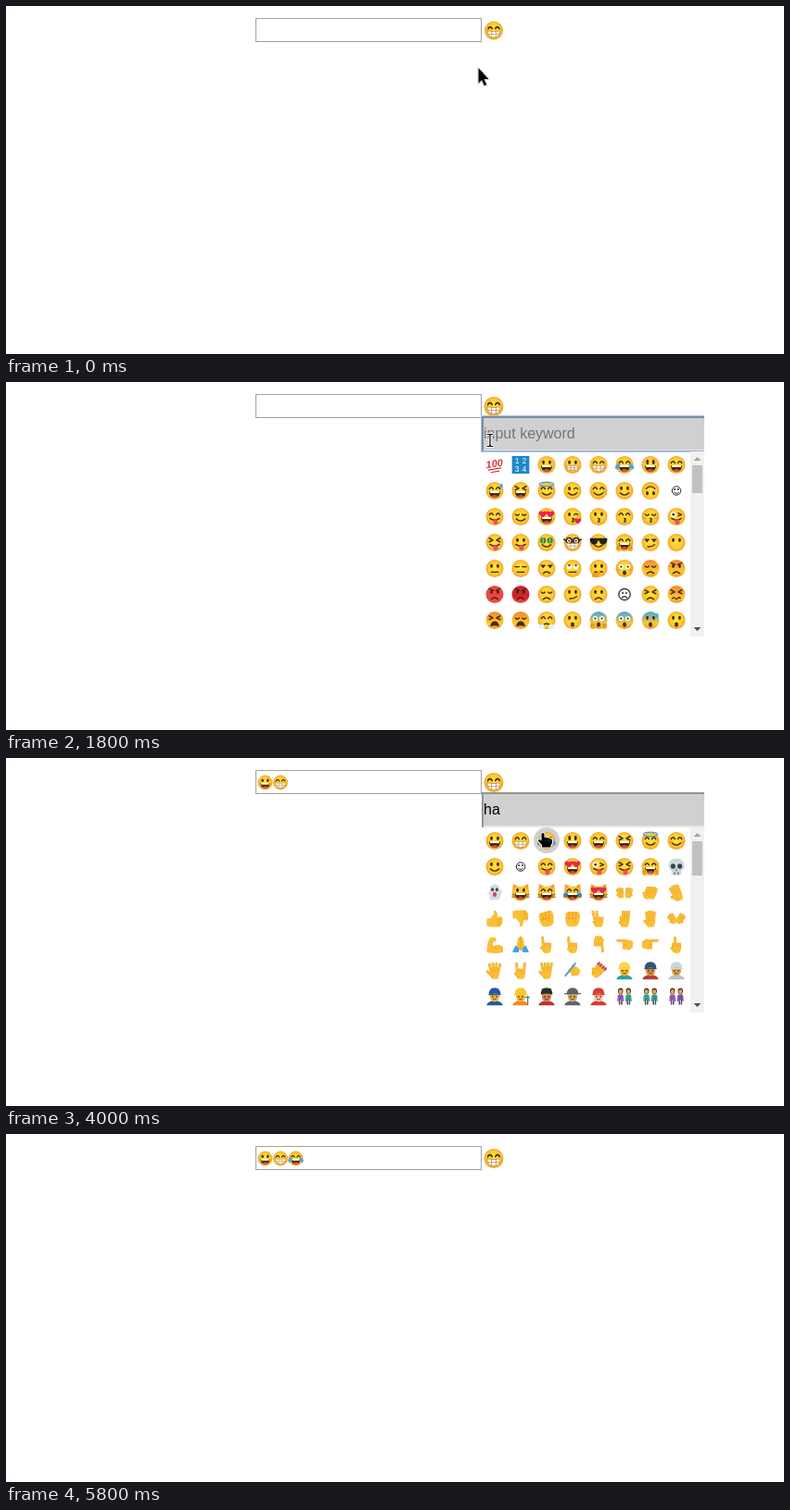
An HTML page with a canvas for the animation above (6 s loop, 839 px wide and 376 px high).

```html
<!DOCTYPE html>
<html lang="en">
<head>
<meta charset="utf-8">
<title>Emoji picker</title>
<style>
html, body { margin: 0; width: 100%; height: 100%; overflow: hidden; background: #fff; }
canvas { display: block; }
</style>
</head>
<body>
<canvas id="stage" width="839" height="376"></canvas>
<script>
const ctx = document.getElementById('stage').getContext('2d');
const INK = '#422b0d', SKIN = '#fbbf36', CREASE = '#e29a1e', GREY = '#d0d0d0';

// Drawing helpers
const rect = (x, y, w, h, color) => { ctx.fillStyle = color; ctx.fillRect(x, y, w, h); };
const fill = (d, color = INK) => { ctx.fillStyle = color; ctx.fill(new Path2D(d)); };
const line = (d, width = 1.4, color = INK) => {
  ctx.lineWidth = width;
  ctx.strokeStyle = color;
  ctx.stroke(new Path2D(d));
};
const dot = (x, y, rx, ry = rx, color = INK) => {
  ctx.beginPath();
  ctx.ellipse(x, y, rx, ry, 0, 0, 7);
  ctx.fillStyle = color;
  ctx.fill();
};
const text = (s, x, y, font, color) => {
  ctx.font = font + ' "Liberation Sans", Arial, sans-serif';
  ctx.fillStyle = color;
  ctx.fillText(s, x, y);
};
const at = (x, y, sx, draw, turn = 0, sy = sx) => {
  ctx.save();
  ctx.translate(x, y);
  ctx.rotate(turn * Math.PI / 180);
  ctx.scale(sx, sy);
  draw();
  ctx.restore();
};
const mirror = draw => { draw(); at(0, 0, -1, draw, 0, 1); };
const heart = (x, y, s) => at(x, y, s, () =>
  fill('M0 3C-6-1-3-4.5 0-1.8C3-4.5 6-1 0 3Z', '#e8264a'));

// Faces live in a circle of radius 10: eyes, mouth, then extras
const wide = (dy = 0, r = 1.2) => mirror(() => {
  dot(3.8, -2, 2.8, 2.8, '#fff');
  dot(3.8, -2 + dy, r);
});
const eyes = {
  o: () => mirror(() => dot(3.6, -2.8, 1.5, 2.2)),
  e: () => mirror(() => dot(3.4, -3.2, 1.5, 2.8)),
  '^': () => mirror(() => line('M1.7-2Q3.8-5.8 6-2', 1.6)),
  '>': () => mirror(() => line('M6.2-5L2-2.8 6.2-.8', 1.5)),
  '-': () => mirror(() => line('M1.7-2H6.4')),
  v: () => mirror(() => line('M1.7-2.6Q3.8 0 6-2.6')),
  w: () => { dot(-3.6, -2.6, 1.5, 2.2); line('M1.7-2Q3.8-4.6 6-2'); },
  h: () => mirror(() => heart(4.3, -2.8, 1.3)),
  $: () => mirror(() => { dot(3.9, -2.4, 3.2, 3.4, '#2e8b3d'); line('M3.9-4.8V0', 1, '#b6e08c'); }),
  g: () => { wide(); mirror(() => line('M.8-2A3.2 3.2 0 1 1 7.2-2 3.2 3.2 0 1 1 .8-2M7.2-2.6L9.6-3.5', 1.7, '#2b2622')); },
  S: () => fill('M-9.8-5H9.8V-2.5Q8.5 2.2 5 2.2 1.3 2.2.8-2H-.8Q-1.3 2.2-5 2.2-8.5 2.2-9.8-2.5Z', '#26211d'),
  s: () => mirror(() => { line('M1.8-3.4H6.2'); dot(4, -2, 1.4); }),
  O: () => wide(),
  u: () => wide(-1.5),
  z: () => { dot(-3.6, -2.5, 3, 3, '#fff'); dot(-3.4, -2.5, 1.5); line('M1.9-4L5.8-2.3 1.9-.8'); }
};
const mouths = {
  D: () => {
    fill('M-6.4 .6H6.4Q6 7.8 0 7.8T-6.4 .6Z');
    fill('M-5.6 .6H5.6L5 2.7H-5Z', '#fff');
    dot(0, 6.3, 3, 1.3, '#ed4d5e');
  },
  G: () => {
    const d = 'M-6.8 .4Q0 1.6 6.8 .4 6.6 7.5 0 7.5T-6.8 .4Z';
    fill(d, '#fff');
    line(d + 'M-6 3.9H6M-2.3 1V7M2.3 1V7', .6, '#a9783f');
  },
  E: () => {
    const d = 'M-6 .8H6V6H-6Z';
    fill(d, '#fff');
    line(d + 'M-6 3.4H6M-2 .8V6M2 .8V6', .6, '#9d7342');
  },
  m: () => line('M-5 2.4Q0 7.4 5 2.4'),
  n: () => line('M-3.8 5.6Q0 1.8 3.8 5.6'),
  '-': () => line('M-4 4H4'),
  o: () => dot(0, 4.8, 2.1, 2.7),
  k: () => line('M-.5 2Q3 2.2 .2 4Q3 5.5-.5 6'),
  p: () => { line('M-5.5 2Q0 6 5.5 2'); dot(1, 5.8, 2.7, 3, '#ee4b60'); },
  s: () => line('M-3 4.7Q2 5 4.7 2.2'),
  '~': () => line('M-4.5 4.6Q-3 2.5-1.5 4.4T1.5 4.4 4.5 4.2'),
  A: () => fill('M-5 7Q-4.5 1 0 1T5 7Q0 5-5 7Z'),
  '.': () => {}
};
const extras = {
  t: () => mirror(() => at(7.8, 2, 1, () => dot(0, 0, 2.2, 3.5, '#4aa3e6'), -35)),
  d: () => fill('M7.5-9Q11-4 7.5-3.3T7.5-9Z', '#4aa3e6'),
  a: () => line('M-8-7.4C-8-10.6 8-10.6 8-7.4S-8-4.2-8-7.4', 1.4, '#4b9fe0'),
  b: () => mirror(() => dot(6.6, 1.5, 2, 1.4, '#f58a3c99')),
  h: () => heart(6, 5, 1.1),
  H: () => mirror(() => { dot(6.6, 6.6, 3, 3.4, '#f5ad2a'); line('M5.3 4L6.5 7M7.5 3.5L7.8 6.5', .7, '#c97908'); }),
  B: () => mirror(() => line('M1.4-4.4L6.2-6.6')),
  T: () => { dot(-3.5, 8, 4, 2.3, '#ef9b1c'); line('M-5 7L1 4.5', 2.2, '#ef9b1c'); },
  q: () => mirror(() => dot(5.5, 7, 3.6, 2.4, '#e9eef1')),
  C: () => mirror(() => line('M5.5 3L9.8 2.2M5.5 4.5L9.8 5.2', .7))
};
const tones = { r: '#f58a2a', R: '#ee4545', K: '#d0242f', c: '#52a9d6', C: '#fdc63a' };

function face(code) {
  const [eye, mouth, ...more] = code;
  const tone = more.find(k => tones[k]);
  const red = tone === 'R' || tone === 'K', cat = tone === 'C';
  const glow = tone && !cat ? ctx.createLinearGradient(0, -9, 0, 9) : ctx.createRadialGradient(0, -2, 1, 0, 0, 10);
  glow.addColorStop(0, tones[tone] || '#ffe03c');
  glow.addColorStop(.7, red ? tones[tone] : '#fdc92f');
  glow.addColorStop(1, red ? '#e8503f' : '#f0a024');
  if (cat) mirror(() => fill('M1-6L8.6-10 9.4 1Z', '#f2a325'));
  const draw = () => {
    if (cat) dot(0, 1, 9.7, 8.4, glow);
    else dot(0, 0, 10, 10, glow);
    eyes[eye]();
    mouths[mouth]();
  };
  at(0, 0, 1, draw, more.includes('f') ? 180 : 0);
  more.forEach(k => extras[k] && extras[k]());
}

// Digits give the length of each finger; short hands are centred
function hand(turn, fingers, thumb = 0, spread = .06, x = 0, size = 1) {
  at(x, 0, size, () => {
    ctx.translate(0, (Math.max(...fingers) - 8.5) / 2);
    const finger = d => { line(d, 2.9, CREASE); line(d, 2.2, SKIN); };
    fill('M-5 1.5H5V5Q4.5 9 3 9.5H-3Q-4.5 8.5-5 5Z', SKIN);
    if (+thumb) finger(`M-3 6L${-3.5 - thumb * .6} ${5.5 - thumb * .55}`);
    [...fingers].forEach((n, i) => {
      const base = (i - 1.5) * 2.5;
      finger(`M${base} 3L${base + (i - 1.5) * n * spread} ${1 - n}`);
    });
    fill('M-4.5 2.6H4.5V5.5H-4.5Z', SKIN);
  }, +turn);
}

// Everything that is not a face
const shapes = {
  hand,
  hands: turn => {
    hand(-turn, '7887', 4, .06, -4.7, .68);
    at(0, 0, -1, () => hand(-turn, '7887', 4, .06, -4.7, .68), 0, 1);
  },
  clap() { hand(25, '7887', 4, .04, -2.5, .8); hand(15, '7887', 5, .04, 2.5, .8); },
  thumb(flip) {
    at(0, 0, 1, () => {
      fill('M-9 0H-5L-1-5V-9Q3.5-10 3-2H7.5Q9.5-1 8.5 1.5 9.6 3 8.2 4.8 8.6 6.5 7 7.5 7 9 5 9.5H-4L-9 8.5Z', SKIN);
      line('M3 1.5H8M3 4.8H7.8M3 7.5H6.5', .8, CREASE);
    }, 0, +flip);
  },
  fist(turn) {
    at(0, 0, 1, () => {
      fill('M-8-4Q-8-8-4-8H4.5Q9-8 8.5-2L7 5Q6 9 2.5 9H-3Q-8 8-8 2Z', SKIN);
      line('M-4-7V-1M0-7.5V-1M4-7V-1M-7 0H3Q5 2 1 4', .9, CREASE);
    }, +turn);
  },
  hundred() {
    at(0, 0, 1, () => text('100', -9.8, 2.5, 'italic bold 11.5px', '#d9343f'), -8);
    line('M-7 6L7 3.5M-4 8.7L5 7', 1.3, '#d9343f');
  },
  digits() {
    rect(-10, -10, 20, 20, '#1c87c9');
    [...'1234'].forEach((n, i) => text(n, i % 2 * 8 - 6.5, i > 1 ? 8 : -1.5, '9px', '#fff'));
  },
  plain(r, bend) {
    line(`M${-r} 0A${r} ${r} 0 1 1 ${r} 0 ${r} ${r} 0 1 1 ${-r} 0M-2.8 ${2.7 - bend / 2}Q0 ${2.7 + +bend} 2.8 ${2.7 - bend / 2}`, r * .2, '#222');
    mirror(() => dot(2, -1.6, 1, 1, '#222'));
  },
  skull() {
    fill('M-9-1Q-9-9.5 0-9.5T9-1Q8.5 4 5.5 4.5V9H-5.5V4.5Q-8.5 4-9-1Z', '#cfd8dc');
    mirror(() => dot(3.8, -.5, 2.7, 2.9, '#37424a'));
    line('M0 3V4.5M-2 6.5V9M2 6.5V9', 1, '#37424a');
  },
  ghost() {
    fill('M-5 9Q-6 5-6 2L-9 0-6-1Q-6-9.5 0-9.5T6-2L9-4 7 2Q6 10-1 8Z', '#d5dde1');
    mirror(() => dot(2.5, -3.5, 1.5, 2, '#37424a'));
    dot(0, 2, 2.2, 2.8, '#d8435b');
  },
  arm() {
    fill('M-9 9Q-9-3-5-8L1-8 2-4-2-3-2 2Q6-2 9.5 3V9Q0 11-9 9Z', SKIN);
    line('M-2 2Q1 3 2 5', .9, CREASE);
  },
  pray() {
    mirror(() => { fill('M0-9.5L3-7 5 4 0 7Z', SKIN); fill('M2 4L6 1 9.5 9H2Z', '#42a5e0'); });
    line('M0-9V7', .8, CREASE);
  },
  write() { hand(-60, '4333', 4, 0, 2, .9); line('M-8 6L3-8', 2, '#4c9fd0'); },
  nails() {
    hand(40, '7777', 4);
    at(0, 0, 1, () => [-5, -1.8, 1.8, 5].forEach(x => dot(x, -6, 1.3, 2.2, '#d8386c')), 40);
  },
  person(hat, skin, shirt, brim = 'M-6.5-2H6.5', tool) {
    dot(0, 10, 9, 5, shirt);
    dot(0, 0, 5.4, 6.3, skin);
    fill('M-6.5-1.8Q-7-9.8 0-9.8T6.5-1.8Q0-4.5-6.5-1.8Z', hat);
    line(brim, 1.2, hat);
    mirror(() => dot(2.2, .4, .8, 1));
    line('M-1.5 3.4H1.5', .8);
    if (tool) line('M8 9V0M6 1H10', 1.5, tool);
  },
  pair(...shirts) {
    shirts.forEach((shirt, i) => at(i * 9 - 4.5, 0, 1, () => {
      dot(0, -6, 2.9, 3.6, '#5b3a28');
      dot(0, -5.3, 1.9, 2.4, '#eab04a');
      line('M-2.4-.5L-3 5M2.4-.5L3 5', 1.4, shirt);
      fill('M-2.5-2H2.5L2 4H-2Z', shirt);
      line('M-1.2 4V9M1.2 4V9', 1.6, '#4a4f66');
    }));
  }
};

function emoji(code, x, y, size = .95) {
  at(x, y, size, () => {
    if (!code.includes(':')) return face(code);
    const [name, args] = code.split(':');
    ctx.beginPath();
    ctx.rect(-10.2, -10.2, 20.4, 20.4);
    ctx.clip();
    shapes[name](...args.split(','));
  });
}

const allEmoji = `hundred: digits: oD oE ^G ^Dt eD ^D
  ^Dd >D ^ma wm ^mb om omf plain:5,2
  ^p vm hD wkh ok ^k vkb zp
  >p op $m gG Sm ^DH ss o.
  o- -- sn u- o~T Oob vnr onBr
  onBR onBK vn os on plain:6.5,-2 >n >~r
  >Ar vAr ^nq oo OocH Ooc oocd oo`.split(/\s+/);
const foundEmoji = `oD ^G ^Dt eD ^D >D ^ma ^mb
  om plain:5,2 ^p hD zp >p ^DH skull:
  ghost: oDC ^DC ^DtC hDC hands:12 clap: hand:-25,8998,6,.06
  thumb:1 thumb:-1 fist:-15 fist:0 hand:0,9922,3,.2 hand:0,3999,3,.1 hand:0,8998,5 hands:35
  arm: pray: hand:0,9222,4 hand:0,9222,2 hand:180,9222,2 hand:-90,2229,2 hand:90,9222,2 hand:0,2922,3
  hand:0,8998,8,.18 hand:0,9229,4 hand:0,9999,7,.14 write: nails: person:#fbd84b,#f7b52c,#29a3a3 person:#34507a,#e0913f,#b83a3a person:#cfd4d6,#d9a550,#b9c2c5
  person:#2457a0,#f6b73c,#2457a0 person:#fdc928,#f6b73c,#f08a24,M-7-2H7,#777 person:#2b2b2b,#c98a4c,#c62f33,M-5-8H5 person:#59646b,#d6a35d,#59646b,M-9-3H9 person:#d93a3a,#f3c79b,#d93a3a pair:#8e4bb5,#27a18f pair:#27a18f,#3d8f7c pair:#a04bb0,#8145a8`.split(/\s+/);

// Pointer steps: time, x, y
const path = [
  [0, 509, 67], [100, 511, 62], [200, 515, 54], [300, 520, 46], [400, 524, 37], [500, 524, 34],
  [800, 525, 33], [1000, 524, 48], [1100, 522, 63],
  [3100, 521, 70], [3200, 522, 82], [3300, 520, 89],
  [3600, 530, 87], [3700, 545, 85], [3800, 552, 84], [4000, 579, 81],
  [4300, 594, 83], [4500, 590, 86], [4600, 572, 78], [4700, 550, 60], [4800, 533, 38], [4900, 526, 30],
  [5200, 449, 78], [5300, 350, 80], [5400, 240, 72], [5500, 150, 58], [5600, 104, 36], [5700, 77, 9],
  [5800, -50, 0]
];

const pointers = {
  arrow() {
    const d = 'M.5 0V16.5L4 13 6.8 19 9.3 18 6.6 12H11.5Z';
    line(d, 1.8, '#bbb');
    line(d, 1, '#fff');
    fill(d, '#000');
  },
  hand() {
    const d = 'M-1.5 1Q0-1 1.5 1V5Q3 4 4.5 5.5 6 4.7 7.5 6.2 10 6 10 8V11L8.5 13V15.5H-1V13L-5 8.5Q-5 6-2.5 7.5L-1.5 8.5Z';
    line(d, 2.4, '#bbb');
    line(d, 1.6, '#fff');
    fill(d, '#000');
    line('M3 7V9M5.5 7.5V9M8 8V9.5', .5, '#777');
  },
  beam() {
    const d = 'M-3-6.5H-1L0-5.5 1-6.5H3M0-5.5V5.5M-3 6.5H-1L0 5.5 1 6.5H3';
    line(d, 3, '#fff');
    line(d, 1.2, '#000');
  }
};

function drawPicker(t, x, y) {
  const focused = t >= 1300 && t < 3300, searched = t >= 2200;
  if (focused) rect(512, 36, 241, 40, '#a9c3e2');
  rect(513, 37, 240, 38, focused ? '#7b8b9e' : '#949494');
  rect(515, 39, 238, 36, '#e6e6e6');
  rect(515, 39, 238, 34, GREY);
  if (focused) rect(514, 74, 239, 1, '#9fb4cd');
  text(searched ? 'ha' : 'input keyword', 515, 61, '16px', searched ? '#000' : '#757575');
  if (t >= 1300 && t < 1800) rect(515, 47, 1, 18, '#000');
  if (t >= 2200 && t < 2800) rect(533, 47, 1, 18, '#000');

  const column = Math.floor((x - 513) / 28), row = Math.floor((y - 75) / 28);
  if (column >= 0 && row >= 0) dot(527 + column * 28, 89 + row * 28, 14, 14, GREY);
  (searched ? foundEmoji : allEmoji).forEach((code, i) =>
    emoji(code, 527 + i % 8 * 28, 89.5 + Math.floor(i / 8) * 28));

  rect(738, 75, 15, 200, '#f1f1f1');
  rect(740, 90, 11, searched ? 37 : 30, '#c1c1c1');
  fill('M741.5 85H749.5L745.5 81Z', '#a3a3a3');
  fill('M741.5 265H749.5L745.5 269Z', '#505050');
}

function render() {
  const t = performance.now() % 6000;
  const [, x, y] = path.findLast(step => step[0] <= t);
  const open = t >= 900 && t < 5500;
  const lagging = t >= 5200 && t < 5300;
  const onButton = lagging || x >= 513 && x < 539 && y >= 13 && y < 39;

  rect(0, 0, 839, 376, '#fff');
  ctx.lineCap = ctx.lineJoin = 'round';
  rect(269, 13, 244, 26, '#a0a0a0');
  rect(270, 14, 242, 24, '#fff');
  [['oD', 3500], ['^G', 3900], ['^Dt', 4200]].forEach(([code, time], i) => {
    if (t >= time) emoji(code, 279.5 + i * 16.5, 26.5, .79);
  });
  if (onButton) rect(513, 13, 26, 26, GREY);
  emoji('^G', 526, 26.5, t < 900 ? 1 : 1.05);
  if (open) drawPicker(t, x, y);

  const inPicker = open && x >= 513 && y >= 37;
  const kind = onButton ? 'hand' : !inPicker ? 'arrow' : y < 75 ? 'beam' : 'hand';
  at(x, y, 1, pointers[kind]);
  requestAnimationFrame(render);
}
render();
</script>
</body>
</html>
```
